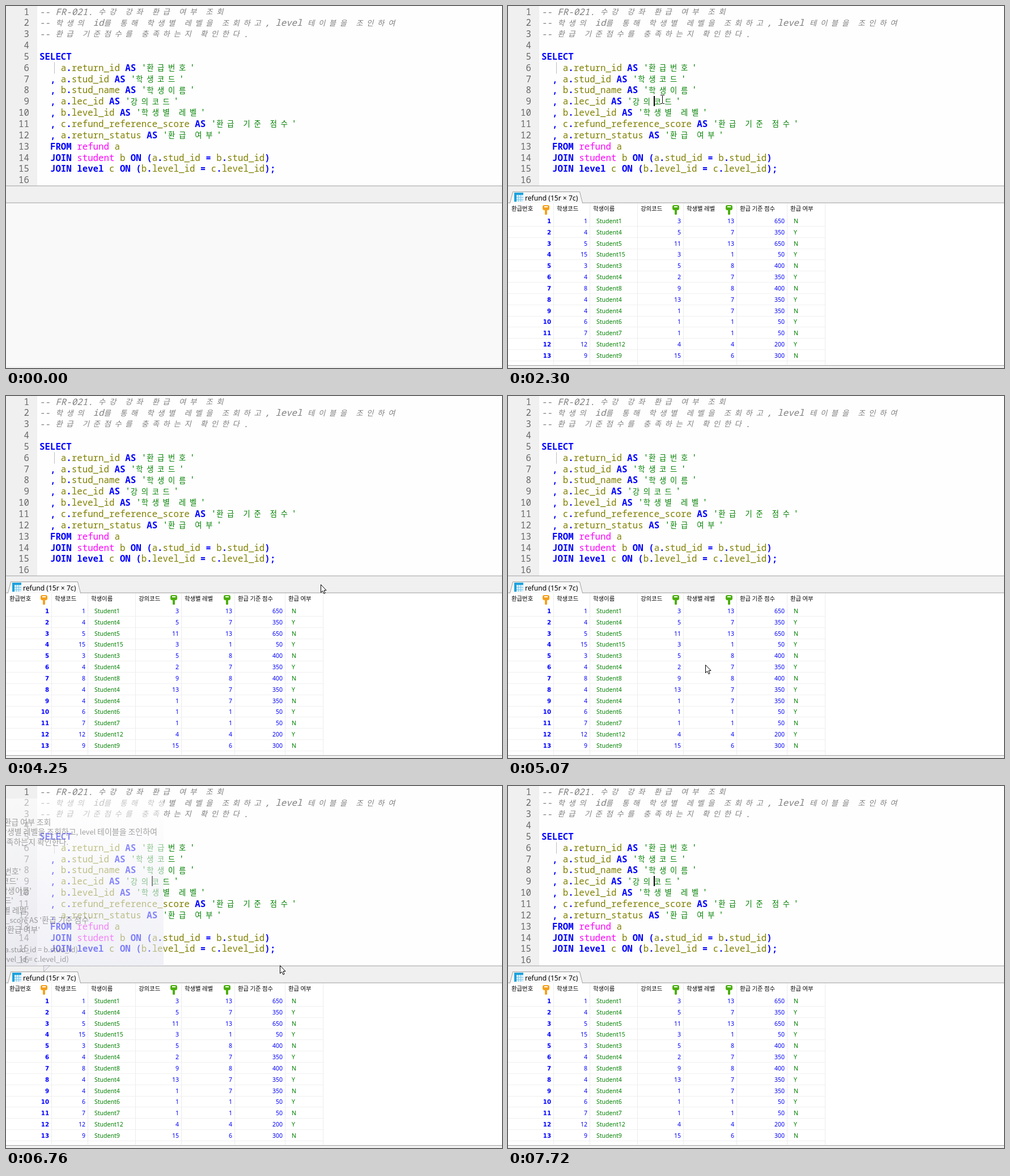
An HTML page with a canvas that plays this animation: 875x640 px, repeating every 8 s.

```html
<!DOCTYPE html>
<html lang="ko">
<head>
<meta charset="utf-8">
<title>SQL query</title>
<style>
  html, body { margin: 0; width: 100%; height: 100%; overflow: hidden; background: #fff; }
  canvas { display: block; }
</style>
</head>
<body>
<canvas id="stage" width="875" height="640"></canvas>
<script>
const ctx = document.getElementById('stage').getContext('2d');
const LOOP = 8000, STEP = 69.7, BLINK = 539;
const CELL = 9.46, LINE = 19.85;
const MONO = '"Noto Sans Mono", monospace';
const HANGUL = '"Noto Sans CJK KR", "Noto Sans CJK", sans-serif';
const SANS = '"Noto Sans", sans-serif';
const BLUE = '#0000ff', GREEN = '#008000', GREY = '#a0a0a0';

const sql = `-- FR-021. 수강 강좌 환급 여부 조회
-- 학생의 id를 통해 학생별 레벨을 조회하고, level 테이블을 조인하여
-- 환급 기준점수를 충족하는지 확인한다.

SELECT
    a.return_id AS '환급번호'
  , a.stud_id AS '학생코드'
  , b.stud_name AS '학생이름'
  , a.lec_id AS '강의코드'
  , b.level_id AS '학생별 레벨'
  , c.refund_reference_score AS '환급 기준 점수'
  , a.return_status AS '환급 여부'
  FROM refund a
  JOIN student b ON (a.stud_id = b.stud_id)
  JOIN level c ON (b.level_id = c.level_id);
`.split('\n');

// student:lecture for each refund; the score follows from the student's level
const levels = { 1: 13, 3: 8, 4: 7, 5: 13, 6: 1, 7: 1, 8: 8, 9: 6, 12: 4, 15: 1 };
const rows = '1:3 4:5 5:11 15:3 3:5 4:2 8:9 4:13 4:1 6:1 7:1 12:4 9:15'.split(' ').map((pair, i) => {
  const [student, lecture] = pair.split(':'), level = levels[student];
  return { id: i + 1, student, name: 'Student' + student, lecture, level, score: level * 50, status: 'NY'[i % 2] };
});

const columns = [
  { field: 'id', label: '환급번호', right: 80, key: '#f5a11c' },
  { field: 'student', label: '학생코드', right: 144 },
  { field: 'name', label: '학생이름', right: 228, isText: true },
  { field: 'lecture', label: '강의코드', right: 309, key: '#4caf0c' },
  { field: 'level', label: '학생별 레벨', right: 403, key: '#4caf0c' },
  { field: 'score', label: '환급 기준 점수', right: 492 },
  { field: 'status', label: '환급 여부', right: 559, isText: true }
];

// time, x, y of the pointer
const path = [
  [130, 836, 604], [540, 320, 115], [690, 272, 165], [2530, 272, 165], [3110, 569, 359],
  [4250, 555, 333], [4640, 169, 430], [5110, 369, 480], [5560, 95, 550], [6062, 53, 630],
  [6330, 66, 328], [6690, 66, 328], [6758, 483, 317], [7110, 848, 330]
];

function rect(x, y, w, h, color) {
  ctx.fillStyle = color;
  ctx.fillRect(x, y, w, h);
}

function text(str, x, y, font, color, align = 'left') {
  ctx.font = font;
  ctx.fillStyle = color;
  ctx.textAlign = align;
  ctx.fillText(str, x, y);
}

function shape(points, fill, stroke) {
  ctx.beginPath();
  points.forEach(([x, y]) => ctx.lineTo(x, y));
  ctx.closePath();
  ctx.fillStyle = fill;
  ctx.fill();
  ctx.strokeStyle = stroke;
  ctx.lineWidth = 1;
  ctx.stroke();
}

function tokenStyle(token) {
  if (token.startsWith('--')) return ['italic 500', '#808080'];
  if (token[0] === "'") return ['500', GREEN];
  if (/^([A-Z]+|level)$/.test(token)) return ['bold', BLUE];
  if (/^(refund|student)$/.test(token)) return ['500', '#ff00ff'];
  return /^\w/.test(token) ? ['500', '#808000'] : ['bold', BLUE];
}

function drawCode(line, y) {
  let col = 0;
  for (const token of line.match(/--.*|'[^']*'|\w+|\s+|./g) || []) {
    const [style, color] = tokenStyle(token);
    for (const ch of token) {
      const wide = /[가-힣]/.test(ch);
      const font = wide ? `${style} 13.3px ${HANGUL}` : `${style} 15.77px ${MONO}`;
      if (ch !== ' ') text(ch, 59 + col * CELL, y - (wide ? 0.8 : 0), font, color);
      col += wide ? 2 : 1;
    }
  }
}

function drawEditor() {
  rect(0, 0, 875, 318, '#fefefe');
  rect(0, 0, 55, 318, '#f0f0f0');
  sql.forEach((line, i) => {
    const y = 15.5 + i * LINE;
    text(i + 1, 41, y, `15.77px ${MONO}`, '#686868', 'right');
    drawCode(line, y);
  });
  for (let y = 100; y < 120; y += 2) rect(85, y, 1, 1, '#808080');
}

function drawPanel() {
  rect(0, 318, 875, 30, '#f0f0f0');
  rect(0, 348, 875, 292, '#f9f9f9');
  rect(0, 317.5, 875, 1, GREY);
  rect(0, 347.5, 875, 1, GREY);
  rect(0, 637, 875, 3, '#f0f0f0');
}

function drawKey(x, color) {
  ctx.fillStyle = color;
  ctx.beginPath();
  ctx.roundRect(x - 6, 352, 12, 9, 3);
  ctx.roundRect(x - 2, 360, 4, 9, 1.5);
  ctx.fill();
  rect(x - 3, 354, 6, 2, '#fff');
}

function drawTab() {
  shape([[3.5, 348.5], [8.5, 328.5], [126.5, 328.5], [131.5, 348.5]], '#f9f9f9', GREY);
  rect(4, 347, 127, 2, '#f9f9f9');
  rect(11, 330, 16, 16, '#1ba1dc');
  rect(15, 334, 12, 12, '#d8effb');
  for (const d of [18, 22]) {
    rect(d, 334, 1, 12, '#7cc8ec');
    rect(15, d + 320, 12, 1, '#7cc8ec');
  }
  text('refund (15r × 7c)', 30, 344, `12.1px ${SANS}`, '#000');
}

function drawColumn({ field, label, right, key, isText }, left) {
  rect(right, 349, 1, 286, '#ececec');
  text(label, left + 6, 362, `10.4px ${HANGUL}`, '#000');
  if (key) drawKey(right - 13, key);
  const font = field === 'id' ? 'bold 10.2px "DejaVu Sans", sans-serif' : `10.5px ${SANS}`;
  rows.forEach((row, i) => {
    const y = 384 + i * 19.83;
    if (isText) text(row[field], left + 12, y, font, GREEN);
    else text(row[field], right - 4, y, font, BLUE, 'right');
  });
}

function drawGrid() {
  rect(0, 349, 875, 286, '#fff');
  rows.forEach((row, i) => rect(0, Math.round(389 + i * 19.83), 560, 1, '#f0f0f0'));
  columns.forEach((column, i) => drawColumn(column, i ? columns[i - 1].right : 0));
  text('Student2', 156, 641.5, `10.5px ${SANS}`, GREEN);
  rect(0, 634, 875, 1, '#fff');
  rect(0, 635, 875, 1, GREY);
  rect(0, 636, 875, 4, '#f0f0f0');
}

function drawHintLine(line, y) {
  let x = -120;
  for (const run of line.match(/[가-힣]+|[^가-힣]+/g) || []) {
    text(run, x, y, `${/[가-힣]/.test(run) ? 14 : 12.8}px ${HANGUL}`, '#575757');
    x += ctx.measureText(run).width;
  }
}

function drawHint(alpha) {
  if (alpha <= 0) return;
  ctx.save();
  ctx.globalAlpha = alpha;
  const fill = ctx.createLinearGradient(0, 22, 0, 318);
  fill.addColorStop(0, '#fff');
  fill.addColorStop(1, '#e4e5f0');
  rect(0, 22, 278, 296, fill);
  shape([[66.5, 317.5], [77.5, 317.5], [66.5, 328.5]], '#e4e5f0', '#909090');
  sql.forEach((line, i) => drawHintLine(line.trim().replace(';', ''), 69 + i * 17.3));
  ctx.restore();
}

function pointerAt(t) {
  const next = path.findIndex(([time]) => time > t);
  if (next < 1) return null;
  const [t0, x0, y0] = path[next - 1], [t1, x1, y1] = path[next];
  const u = (t - t0) / (t1 - t0), e = u * u * (3 - 2 * u);
  return [x0 + (x1 - x0) * e, y0 + (y1 - y0) * e];
}

function drawPointer(pos) {
  if (!pos) return;
  const [x, y] = pos.map(Math.round);
  if (y < 316) {
    rect(x, y - 7, 1, 14, '#000');
    for (const dy of [-8, 7]) {
      rect(x - 3, y + dy, 3, 1, '#000');
      rect(x + 1, y + dy, 3, 1, '#000');
    }
    return;
  }
  const outline = [[0, 0], [0, 14], [3, 11], [5.5, 16], [7.5, 15], [5.5, 10.2], [9.5, 10]];
  shape(outline.map(([dx, dy]) => [x + dx + 0.5, y + dy + 0.5]), '#fff', '#000');
}

function caretVisible(t) {
  const start = t < 2300 ? 750 : 2300;
  const blinks = Math.floor((t - start) / BLINK);
  return start === 750 ? blinks === 0 : blinks % 2 === 0;
}

function hintAlpha(t) {
  const fadeIn = (t - 6380) / 200, fadeOut = (6880 - t) / 220;
  return Math.max(0, Math.min(1, fadeIn, fadeOut));
}

function draw(t) {
  const stepped = 4250 + Math.floor((t - 4250 + 1) / STEP) * STEP;
  drawEditor();
  if (caretVisible(t)) rect(257, 159, 2, 18, '#000');
  drawPanel();
  if (t >= 1700) {
    drawTab();
    drawGrid();
  }
  drawHint(hintAlpha(stepped));
  drawPointer(pointerAt(stepped));
}

function frame() {
  draw(performance.now() % LOOP);
  requestAnimationFrame(frame);
}
frame();
</script>
</body>
</html>
```
